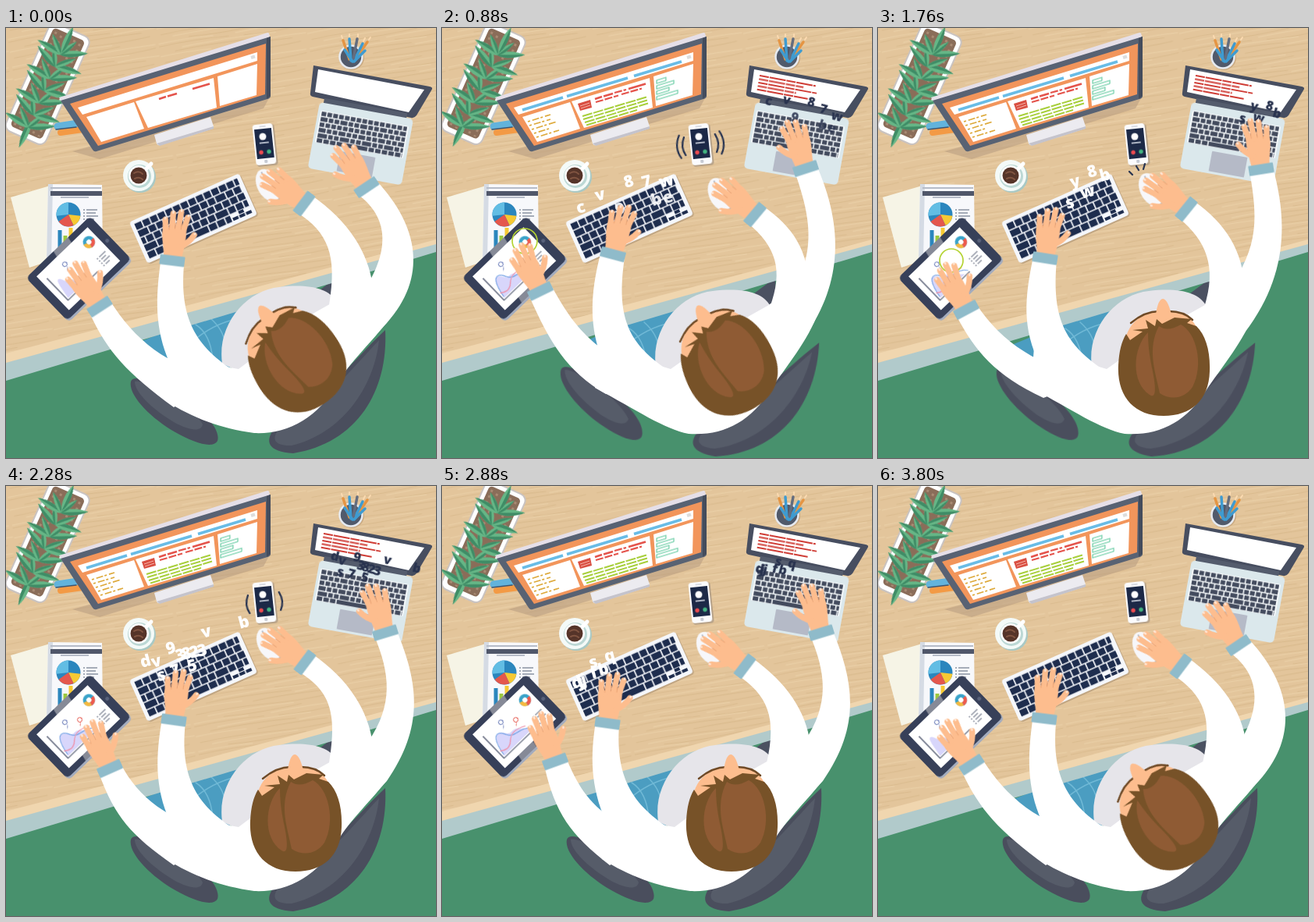
Animation of 551x551 px, one loop 3.84 s. Source, as an HTML page without scripts:

```html
<!DOCTYPE html>
<html lang="en">
<head>
<meta charset="utf-8">
<title>Busy desk</title>
<style>
html, body { margin: 0; width: 100%; height: 100%; overflow: hidden; background: #48916d; }
svg { display: block; width: 100vw; height: 100vh; }
.anim, .row, .burst text { animation: 3.84s ease-in-out infinite; }
.white { fill: #fff; }
.line { fill: none; stroke-linecap: round; }
.burst { font: 800 21px "Open Sans", "Noto Sans", sans-serif; }
.burst text { animation-name: rise; animation-delay: calc(var(--t) - 3.84s); }
.row { animation-name: typed; animation-delay: calc(var(--t) - 3.84s); }
.leaves { animation: sway 1.92s ease-in-out infinite; }

@keyframes rise {
  0% { opacity: 0; transform: translate(2px, 16px); }
  7%, 13% { opacity: 1; }
  10% { transform: none; }
  20%, 100% { opacity: 0; transform: translate(-3px, -14px); }
}
@keyframes typed { 0%, 4% { opacity: 0; } 4.1%, 76% { opacity: 1; } 76.1%, 100% { opacity: 0; } }
@keyframes sway { 50% { transform: rotate(2deg); } }

/* Body: leaning left in the middle of the loop */
@keyframes chair {
  0%, 58%, 100% { transform: none; }
  21%, 46% { transform: translate(-7px) rotate(5.5deg); }
}
@keyframes lean { 0%, 58%, 100% { transform: none; } 21%, 46% { transform: translate(-3px, 5px); } }
@keyframes torso {
  0%, 58%, 100% { d: path("M205,478L207,421L298,437L314,425L395,365L420,351L470,320L490,374C470,402 440,428 425,455C400,500 360,521 318,519C275,513 240,500 205,478Z"); }
  21%, 46% { d: path("M196,461L200,409L293,437L310,425L392,370L417,356L466,322L482,364C470,400 440,435 420,465C395,505 360,523 316,520C285,514 250,490 196,461Z"); }
}
@keyframes head {
  0%, 99%, 100% { transform: translate(372px, 427px) rotate(-33deg); }
  22.9% { transform: translate(367px, 431px) rotate(-27deg); }
  32.3% { transform: translate(367px, 432px) rotate(-12deg); }
  45.8% { transform: translate(366px, 432px); }
  59.4%, 78% { transform: translate(371px, 429px); }
}

/* Hands: cuff position and direction */
@keyframes tabletHand {
  0%, 99%, 100% { transform: translate(120px, 357px) rotate(-33deg); }
  22.9% { transform: translate(126px, 337px) rotate(-26deg); }
  32.3% { transform: translate(124px, 342px) rotate(-27deg); }
  45.8% { transform: translate(113px, 361px) rotate(-28deg); }
  59.4% { transform: translate(133px, 362px) rotate(-24deg); }
  75% { transform: translate(145px, 353px) rotate(-20deg); }
}
@keyframes keyHand {
  0%, 99%, 100% { transform: translate(213px, 298px) rotate(7deg); }
  22.9% { transform: translate(219px, 290px) rotate(15deg); }
  32.3% { transform: translate(217px, 292px) rotate(14deg); }
  45.8% { transform: translate(214px, 295px) rotate(9deg); }
  59.4% { transform: translate(215px, 300px) rotate(8deg); }
  75% { transform: translate(212px, 304px) rotate(8deg); }
}
@keyframes mouseHand {
  0%, 100% { transform: translate(382px, 225px) rotate(-53deg); }
  22.9%, 32.3% { transform: translate(401px, 239px) rotate(-50deg); }
  45.8% { transform: translate(395px, 232px) rotate(-51deg); }
  59.4% { transform: translate(383px, 226px) rotate(-53deg); }
  75%, 99.5% { transform: translate(388px, 231px) rotate(-53deg); }
}
@keyframes laptopHand {
  0%, 99%, 100% { transform: translate(462px, 204px) rotate(-34deg); }
  22.9% { transform: translate(466px, 180px) rotate(-18deg); }
  32.3% { transform: translate(473px, 180px) rotate(-14deg); }
  45.8% { transform: translate(491px, 181px) rotate(-9deg); }
  59.4%, 75% { transform: translate(486px, 188px) rotate(-17deg); }
}

/* Sleeves follow the cuffs */
@keyframes tabletArm {
  0%, 99%, 100% { d: path("M107,365C130,415 155,442 215,486L275,450C205,432 165,400 133,349Z"); }
  22.9% { d: path("M112,344C138,403 160,440 210,469L275,450C195,415 170,385 140,330Z"); }
  32.3% { d: path("M111,349C138,405 160,440 210,469L275,450C195,415 168,388 137,335Z"); }
  45.8% { d: path("M100,368C125,415 150,445 212,474L275,450C205,432 160,405 126,354Z"); }
  59.4% { d: path("M119,368C140,425 160,447 215,486L275,450C205,425 170,400 147,356Z"); }
  75% { d: path("M131,358C145,420 165,447 215,486L275,450C205,430 180,400 159,348Z"); }
}
@keyframes keyArm {
  0%, 99%, 100% { d: path("M198,300C192,345 190,385 210,430L302,445C245,412 222,375 228,304Z"); }
  22.9% { d: path("M204,286C188,345 190,385 205,425L300,445C240,408 222,375 234,294Z"); }
  32.3% { d: path("M202,288C187,345 188,385 205,425L300,445C238,408 220,375 232,296Z"); }
  45.8% { d: path("M199,293C188,345 184,385 208,432L300,445C240,408 222,375 229,297Z"); }
  59.4% { d: path("M200,298C192,345 190,385 210,430L302,445C245,412 222,375 230,302Z"); }
  75% { d: path("M197,302C190,345 190,385 210,430L302,445C245,412 222,375 227,306Z"); }
}
@keyframes mouseArm {
  0%, 100% { d: path("M374,237C412,262 425,290 414,355L470,330C464,288 440,248 391,214Z"); }
  22.9%, 32.3% { d: path("M392,250C428,280 438,310 420,358L470,335C470,285 450,255 411,228Z"); }
  45.8% { d: path("M386,244C420,272 435,305 418,358L470,335C468,285 445,250 405,222Z"); }
  59.4% { d: path("M375,238C415,262 425,290 414,355L470,330C464,288 440,248 392,215Z"); }
  75%, 99.5% { d: path("M380,243C416,268 430,295 416,355L472,330C466,288 442,252 397,220Z"); }
}
@keyframes laptopArm {
  0%, 99%, 100% { d: path("M449,212C482,235 497,272 464,328L430,440L488,378C540,320 530,255 475,196Z"); }
  22.9% { d: path("M452,184C466,225 478,265 462,310L425,450L474,382C518,310 508,240 480,176Z"); }
  32.3% { d: path("M459,183C470,225 480,265 462,310L425,450L474,382C520,310 513,240 487,177Z"); }
  45.8% { d: path("M476,183C485,235 488,270 462,315L425,450L476,382C527,310 523,240 506,179Z"); }
  59.4%, 75% { d: path("M472,192C492,240 497,280 464,328L430,440L488,378C535,310 530,255 500,184Z"); }
}

/* Screens and signals */
@keyframes show1 { 0%, 4% { opacity: 0; } 4.1%, 100% { opacity: 1; } }
@keyframes show2 { 0%, 9% { opacity: 0; } 9.1%, 100% { opacity: 1; } }
@keyframes show3 { 0%, 14% { opacity: 0; } 14.1%, 100% { opacity: 1; } }
@keyframes show4 { 0%, 19% { opacity: 0; } 19.1%, 100% { opacity: 1; } }
@keyframes ring { 0%, 17%, 29%, 56%, 68%, 100% { opacity: 0; } 17.1%, 28.9%, 56.1%, 67.9% { opacity: 1; } }
@keyframes farRing { 0%, 20%, 27%, 61%, 67%, 100% { opacity: 0; } 20.1%, 26.9%, 61.1%, 66.9% { opacity: 1; } }
@keyframes click { 0%, 43%, 49%, 100% { opacity: 0; } 43.1%, 48.9% { opacity: 1; } }
@keyframes chart { 0%, 98%, 100% { transform: scaleX(.55); } 22.9%, 45.8% { transform: scaleX(.85); } 75%, 85% { transform: none; } }
@keyframes curve { 0%, 10%, 90%, 100% { opacity: 0; } 20%, 80% { opacity: 1; } }
@keyframes pin { 0%, 55%, 90%, 100% { opacity: 0; } 58%, 85% { opacity: 1; } }
@keyframes touchTop { 0%, 17%, 29%, 100% { opacity: 0; transform: scale(.4); } 22.9% { opacity: 1; transform: none; } }
@keyframes touchLow { 0%, 39%, 52%, 100% { opacity: 0; transform: scale(.4); } 45.8% { opacity: 1; transform: none; } }
</style>
</head>
<body>
<svg viewBox="0 0 551 551">
<defs>
  <pattern id="grain" width="190" height="48" patternUnits="userSpaceOnUse" patternTransform="rotate(-9) scale(1 .75)">
    <path d="M0,0H190V48H0Z" fill="#e3c59b"/>
    <g class="line" stroke="#dabb8e" stroke-width="1.6">
      <path d="M5,5Q50,1 96,5T180,5M40,15Q80,19 140,14M0,25Q45,21 90,25M110,27Q140,31 185,26M20,36Q70,32 130,37M80,45Q120,42 170,45"/>
    </g>
    <g class="line" stroke="#e9cea5" stroke-width="2">
      <path d="M20,10Q70,7 130,10M0,20Q30,17 70,20M100,21Q145,18 185,20M30,31Q80,27 150,31M0,42Q30,39 65,42M135,40Q160,38 188,40"/>
    </g>
  </pattern>
  <g id="leaf">
    <path d="M0,2C6,-8 5,-22 0,-35C-5,-22 -6,-8 0,2Z" fill="#65b686"/>
    <path d="M0,2C6,-8 5,-22 0,-35Z" fill="#3f8c66"/>
  </g>
  <g id="tier">
    <use href="#leaf" transform="rotate(-82)"/><use href="#leaf" transform="rotate(64)"/>
    <use href="#leaf" transform="rotate(-46) scale(.8)"/><use href="#leaf" transform="rotate(28) scale(.75)"/>
  </g>
  <g id="hand">
    <path d="M-11,0C-12,-16 -18,-26 -17,-40L13,-44C15,-30 13,-14 11,0Z" fill="#fdbd8e"/>
    <g class="line" stroke="#fdbd8e" stroke-width="7.4">
      <path d="M-13,-36L-15,-51M-5.5,-40L-6,-60M2.5,-40L4,-63M9.5,-40L13,-57M7,-18Q18,-24 24,-36"/>
    </g>
    <path class="line" d="M-15.4,-52.5V-54M-6.1,-61V-63M4.2,-64.5V-66M13.6,-59L14,-60M24.5,-37L25,-38" stroke="#ffe6d5" stroke-width="2.5"/>
    <path class="line" d="M-9,-39V-45M-1.5,-41V-48M6.3,-41V-47" stroke="#e9a273" stroke-width=".9"/>
    <rect x="-16" y="-6.5" width="32" height="13" rx="1" fill="#8fbbca"/>
  </g>
</defs>

<path d="M0,0H551V551H0Z" fill="#48916d"/>

<!-- Legs and the far chair arm, partly under the desk -->
<g class="anim" style="animation-name:lean">
  <path d="M172,402L312,345L300,405L285,440L208,430Z" fill="#4b9dc1"/>
  <path class="line" d="M225,385Q240,395 250,418M243,380Q262,392 265,425M262,372Q280,388 280,405M235,405Q265,378 300,372" stroke="#70b9d6" stroke-width="1.5"/>
  <path d="M380,352L430,315L432,352Z" fill="#4b5161"/>
</g>

<!-- Desk -->
<path d="M0,0H551V287L0,452Z" fill="#b1cacb"/>
<path d="M0,0H551V277L0,429Z" fill="#f0d6af"/>
<path d="M0,0H551V271L0,417Z" fill="url(#grain)"/>

<!-- Plant -->
<g transform="translate(53 72) rotate(24)">
  <rect x="-28" y="-76" width="56" height="151" rx="9" fill="#fff" stroke="#c9c3c1" stroke-width="2"/>
  <rect x="-22" y="-70" width="44" height="138" rx="5" fill="#8a6d59"/>
  <path d="M-17,-66V66M-9,-64V66M9,-66V66M17,-64V66" stroke="#a88a73" stroke-width="3" stroke-dasharray="3 5"/>
  <g class="leaves">
    <use href="#leaf" y="58" transform="rotate(180 0 56)"/>
    <use href="#tier" y="60"/><use href="#tier" y="43" transform="scale(-1 1)"/><use href="#tier" y="26"/>
    <use href="#tier" y="9" transform="scale(-1 1)"/><use href="#tier" y="-8"/><use href="#tier" y="-25" transform="scale(-1 1)"/>
    <use href="#tier" y="-42"/><use href="#leaf" y="-46"/>
  </g>
</g>

<!-- Monitor -->
<path d="M85,158L120,168L330,103L338,88Z" fill="#b69b80" opacity=".55"/>
<path class="line" d="M66,126L92,122" stroke="#62b3dc" stroke-width="9"/>
<path class="line" d="M70,134L98,130" stroke="#f39a45" stroke-width="8"/>
<path class="line" d="M64,130L90,127" stroke="#3e5570" stroke-width="1.5"/>
<path d="M190,137L262,114L266,126Q266,129 262,130L198,150Q194,151 193,148Z" fill="#ecebf0"/>
<path d="M193,148L266,126V129L197,151Z" fill="#c4c3cc"/>
<path d="M68,89L335,6Q338,5 338,13L72,96Z" fill="#e5dfe8"/>
<path d="M70,93L339,11V87Q339,90 335,91L116,158Q113,159 111,156Z" fill="#586273"/>
<path d="M334,13L339,11V87L334,91Z" fill="#444c5c"/>
<path d="M82,97L333,20L332,85L118,151Z" fill="#f2955b"/>
<path class="white" d="M92,102L322,31V42L98,111ZM103,114L164,95L177,129L122,146ZM166,94L266,64L270,102L182,128ZM271,62L322,46L321,86L274,100Z"/>
<path d="M314,38L319,36.5" stroke="#ddd" stroke-width="4"/>
<path d="M196,91L205,88M207,87.5L219,84M239,78L261,71.5" stroke="#e4544c" stroke-width="2.5"/>
<path class="anim" style="animation-name:show1" d="M103,105L155,89M160,87.5L238,64M246,61.5L307,43" stroke="#69bce6" stroke-width="3.5"/>
<g class="anim" style="animation-name:show2">
  <path d="M174,97L190,92L192,102L177,106Z" fill="#d94f42"/>
  <path d="M177,100L189,96M178,103L190,99" stroke="#f6b3a8"/>
  <path d="M197,95L226,86.5M230,85L256,77.5M221,83L236,79" stroke="#e4544c" stroke-width="2.2" stroke-dasharray="10 2"/>
</g>
<path class="anim" style="animation-name:show3" d="M180,113L262,88.5M181,117L263,92.5M183,121L264,96.5M185,124.5L250,105" stroke="#a8cf3c" stroke-width="2" stroke-dasharray="13 1.5"/>
<g class="anim" style="animation-name:show4">
  <path d="M110,120L139,111M112,125L139,117M115,130L147,120M118,135L140,128M121,140L150,131" stroke="#dda93a" stroke-width="1.7" stroke-dasharray="3 3 9 2"/>
  <g fill="none" stroke="#4fc394" transform="translate(275 67) skewY(-17)">
    <path d="M0,0H12V4H0ZM0,7H22V11H0ZM0,14H16V18H0ZM0,21H27V25H0Z"/>
  </g>
</g>

<!-- Pencil pot -->
<circle cx="443" cy="38" r="16" fill="#c9a981"/>
<circle cx="442" cy="37" r="14.5" fill="#515a6b" stroke="#e6eaf0" stroke-width="2.5"/>
<g class="line" stroke-width="3.5">
  <path d="M440,40L432,16M449,38L463,18" stroke="#e59543"/><path d="M442,42L440,14M446,42L457,20" stroke="#3f9bd0"/>
  <path d="M445,40L450,14" stroke="#646d7f"/><path d="M444,43L434,28M446,43L460,29" stroke="#3f9bd0"/>
</g>
<path class="line" d="M431,13L430,10M440,11V8M451,11V8M458,17L460,13M465,15L467,12" stroke="#fbdab0" stroke-width="2"/>

<!-- Coffee -->
<circle cx="172" cy="191" r="20" fill="#a9c9c5"/>
<circle cx="170" cy="189" r="20" fill="#f4faf8"/>
<circle cx="171" cy="190" r="15" fill="#bcd8d5"/>
<path class="line" d="M179,181L186,174" stroke="#fff" stroke-width="5"/>
<circle cx="170" cy="189" r="13" class="white"/>
<circle cx="170" cy="189" r="10.5" fill="#553429"/>
<path class="line" d="M164,186Q170,182 175,187M165,193Q171,190 175,194" stroke="#805441" stroke-width="2"/>

<!-- Papers -->
<path d="M6,217L60,201L86,288L30,307Z" fill="#f6f4e6"/>
<path d="M54,200L123,201L124,292L52,299Z" fill="#f7f8fb"/>
<path d="M54,200L60,200L58,298L52,299Z" fill="#d5dbe4"/>
<path d="M57,205H122M70,217H106" stroke="#b6bcc8" stroke-width="2"/>
<path d="M57,212H123" stroke="#50576a" stroke-width="6"/>
<g fill="none" stroke-width="15.5" transform="rotate(-90 80 239)">
  <circle cx="80" cy="239" r="7.75" stroke="#2b86bd"/>
  <circle cx="80" cy="239" r="7.75" stroke="#f6c933" pathLength="100" stroke-dasharray="16 84" stroke-dashoffset="-27"/>
  <circle cx="80" cy="239" r="7.75" stroke="#e4574d" pathLength="100" stroke-dasharray="22 78" stroke-dashoffset="-43"/>
  <circle cx="80" cy="239" r="7.75" stroke="#62bde4" pathLength="100" stroke-dasharray="27 73" stroke-dashoffset="-73"/>
</g>
<path d="M99,233H117M99,237H115M99,241H118M99,245H113" stroke="#8b93a3" stroke-width="1.5" stroke-dasharray="2 2 30"/>
<path d="M69,284V259" stroke="#2b86bd" stroke-width="5"/><path d="M76,284V266" stroke="#9cc83e" stroke-width="5"/><path d="M83,284V256" stroke="#f6c933" stroke-width="5"/>

<!-- Tablet -->
<g transform="translate(93 308) rotate(-44)">
  <rect x="-57" y="-36" width="114" height="77" rx="6" fill="#a3acbe"/>
  <rect x="-57" y="-38" width="114" height="76" rx="6" fill="#374059"/>
  <path d="M-8,-38H18L2,38H-24Z" fill="#868a97"/>
  <rect x="-46" y="-30" width="91" height="60" class="white"/>
  <circle cx="51" cy="0" r="2.5" fill="#59627b"/>
  <g fill="none" stroke-width="4.5">
    <circle cx="33" cy="-15" r="5.5" stroke="#3aa3c9"/>
    <circle cx="33" cy="-15" r="5.5" stroke="#ef5a4c" pathLength="100" stroke-dasharray="30 70"/>
    <circle cx="33" cy="-15" r="5.5" stroke="#f6b93f" pathLength="100" stroke-dasharray="25 75" stroke-dashoffset="-30"/>
  </g>
  <path d="M25,8H40M25,12H37M25,16H40M25,20H36" stroke="#5c6478" stroke-width="1.2" stroke-dasharray="2 2 20"/>
  <path class="anim" style="animation-name:chart;transform-origin:-36px 19px" d="M-36,18C-32,8 -30,-8 -23,-8C-15,-8 -15,3 -7,2C2,1 4,10 16,18Z" fill="#d8d6fb"/>
  <g class="anim line" style="animation-name:curve" stroke-width="1.2">
    <path d="M-35,16C-30,-14 -20,-12 -15,0S4,4 14,17" stroke="#7aa6e6"/><path d="M-35,10Q-25,18 -16,9T10,9" stroke="#ee8fa8"/>
  </g>
  <path d="M-38,-19V20H15" fill="none" stroke="#39425c" stroke-width="1.2"/>
  <g class="line" stroke="#6375b5"><path d="M-9,-11L-12,-8"/><circle cx="-9" cy="-16" r="3"/></g>
  <g class="anim line" style="animation-name:pin" stroke="#e4574d"><circle cx="7" cy="-5" r="3"/><path d="M5,-2L2,1"/></g>
</g>
<g fill="none" stroke="#b4d334" stroke-width="1.7">
  <circle class="anim" style="animation-name:touchTop;transform-origin:106px 273px" cx="106" cy="273" r="16"/>
  <circle class="anim" style="animation-name:touchLow;transform-origin:94px 298px" cx="94" cy="298" r="15"/>
</g>

<!-- Keyboard -->
<g transform="translate(240 244) rotate(-24)">
  <rect x="-76" y="-27" width="154" height="58" rx="4" fill="#c0a582"/>
  <rect x="-77" y="-29" width="154" height="58" rx="4" fill="#f5f7fb"/>
  <g stroke="#1e2d4e" stroke-width="8.5">
    <path d="M-72,-20H72" stroke-dasharray="9 1.7"/><path d="M-72,-10H72" stroke-dasharray="13 1.7 9 1.7 9 1.7"/>
    <path d="M-72,0H72" stroke-dasharray="9 1.7" stroke-dashoffset="4"/><path d="M-72,10H72" stroke-dasharray="16 1.7 9 1.7 9 1.7 9 1.7"/>
    <path d="M-72,20H44" stroke-dasharray="10 1.7 10 1.7 10 1.7 49 1.7 10 1.7"/>
    <path d="M46,22H72M56,17H63" stroke-width="4" stroke-dasharray="7.5 1.7"/>
  </g>
</g>

<!-- Phone -->
<g transform="translate(331 149) rotate(-6)">
  <rect x="-12" y="-25" width="27" height="53" rx="4" fill="#b7a288"/>
  <rect x="-13" y="-26" width="26" height="52" rx="4" fill="#fbfbfd"/>
  <rect x="-11" y="-20" width="22" height="38" fill="#1c2947"/>
  <circle cx="-1" cy="-10" r="4.5" class="white"/>
  <path d="M-6,-2H6" stroke="#dfe5ee" stroke-width="1.5"/>
  <circle cx="-5" cy="10" r="2.7" fill="#ee4b50"/><circle cx="5" cy="10" r="2.7" fill="#43b581"/>
  <circle cy="22" r="2.2" fill="#c5c9d2"/><path d="M-4,-23H4" stroke="#b9bec9"/>
  <g class="line" stroke="#273350" stroke-width="2.3">
    <path class="anim" style="animation-name:ring" d="M-20,-11Q-26,1 -20,12M20,-11Q26,1 20,12"/>
    <path class="anim" style="animation-name:farRing" d="M-26,-14Q-34,1 -26,15M26,-14Q34,1 26,15"/>
  </g>
</g>
<path class="anim line" style="animation-name:click" d="M322,184L326,188M331,177L334,182M342,174L340,181" stroke="#273350" stroke-width="2.2"/>

<!-- Laptop -->
<path d="M394,48L543,75Q548,76 545,80L526,112Q523,116 519,115L393,88Q389,87 390,83Z" fill="#474e60"/>
<path class="white" d="M400,53L536,79L516,108L396,82Z"/>
<g transform="translate(407 61) rotate(10.5)" stroke="#cf3d36" stroke-width="2" stroke-dasharray="12 1 21 1">
  <path class="row" style="--t:0s" d="M0,0H73"/><path class="row" style="--t:.12s" d="M0,4.5H58"/>
  <path class="row" style="--t:.24s" d="M0,9H76"/><path class="row" style="--t:.36s" d="M0,13.5H50"/>
  <path class="row" style="--t:.48s" d="M0,18H66"/>
</g>
<g transform="translate(402 95) rotate(10.3)">
  <path d="M5,-6H113V4H5Z" fill="#545c6d"/>
  <rect width="122" height="86" rx="5" fill="#dbe8ec"/>
  <rect x="3" y="10" width="115" height="42" rx="2" fill="#f3f7f9"/>
  <g stroke="#434b5e" stroke-width="5.6">
    <path d="M5,14H116M5,28H116" stroke-dasharray="6 1.6"/><path d="M5,21H116M5,35H116" stroke-dasharray="9 1.6 6 1.6 6 1.6"/>
    <path d="M5,42H116" stroke-dasharray="12 1.6 6 1.6 6 1.6"/><path d="M5,48.5H116" stroke-dasharray="7 1.6 7 1.6 7 1.6 40 1.6 7 1.6 7 1.6"/>
  </g>
  <rect x="37" y="57" width="46" height="26" rx="1" fill="#b5bac7"/>
</g>

<!-- Chair -->
<g class="anim" style="animation-name:chair;transform-origin:320px 440px">
  <path d="M160,453C163,443 185,453 210,466C250,486 276,513 271,529C265,540 240,531 217,518C185,500 156,470 160,453Z" fill="#4a4e5d"/>
  <path d="M165,453C180,450 240,485 252,508C250,518 235,516 215,505C190,490 165,468 165,453Z" fill="#565c69"/>
  <path d="M486,387C440,430 400,485 345,512C330,530 336,543 368,545C450,532 490,465 486,387Z" fill="#4a4e5d"/>
  <path d="M478,400C440,440 405,485 352,512C338,526 344,536 366,535C430,520 472,460 478,400Z" fill="#565c69"/>
</g>

<!-- Flying characters -->
<g class="burst" fill="#fff" transform="translate(-6 7)">
  <text style="--t:.5s" rotate="-15" x="180 204 241 264 286" y="231 215 198 198 198">cv87w</text>
  <text style="--t:.68s" rotate="-15" x="229 275 290" y="226 214 211">9be</text>
  <text style="--t:.86s" rotate="-15" x="197 274 292 250 266 284 299" y="211 192 181 229 215 208 207">v8w9wbd</text>
  <text style="--t:1.36s" rotate="-15" x="254 276 292 248 267" y="198 185 190 225 212">y8bsw</text>
  <text style="--t:1.88s" rotate="-15" x="180 194 213 225 233 243 253 258 306" y="226 226 209 218 216 214 212 188 176">dv93823vb</text>
  <text style="--t:2s" rotate="-15" x="201 218 240" y="241 235 229">s75</text>
  <text style="--t:2.48s" rotate="-15" x="174 182 186 198 208 216 196" y="253 251 249 240 236 219 227">djjfbqs</text>
</g>
<g class="burst" fill="#28324e" transform="translate(420 95) rotate(30) scale(.78) translate(-186 -224)">
  <text style="--t:.5s" rotate="-15" x="180 204 241 264 286" y="231 215 198 198 198">cv87w</text>
  <text style="--t:.68s" rotate="-15" x="229 275 290" y="226 214 211">9be</text>
  <text style="--t:.86s" rotate="-15" x="197 274 292 250 266 284 299" y="211 192 181 229 215 208 207">v8w9wbd</text>
  <text style="--t:1.36s" rotate="-15" x="254 276 292 248 267" y="198 185 190 225 212">y8bsw</text>
  <text style="--t:1.88s" rotate="-15" x="180 194 213 225 233 243 253 258 306" y="226 226 209 218 216 214 212 188 176">dv93823vb</text>
  <text style="--t:2s" rotate="-15" x="201 218 240" y="241 235 229">s75</text>
  <text style="--t:2.48s" rotate="-15" x="174 182 186 198 208 216 196" y="253 251 249 240 236 219 227">djjfbqs</text>
</g>

<!-- Person -->
<path class="anim" style="animation-name:lean" d="M277,430C270,380 308,336 350,332C385,328 414,332 424,352L380,425L302,442Z" fill="#e6e5ea"/>
<g class="white">
  <path class="anim" style="animation-name:torso"/>
  <path class="anim" style="animation-name:tabletArm"/>
  <path class="anim" style="animation-name:keyArm"/>
  <path class="anim" style="animation-name:mouseArm"/>
  <path class="anim" style="animation-name:laptopArm"/>
</g>
<g class="anim" style="animation-name:tabletHand"><use href="#hand"/></g>
<g class="anim" style="animation-name:keyHand"><use href="#hand"/></g>
<g class="anim" style="animation-name:mouseHand">
  <g transform="translate(-9 -51) rotate(26)">
    <ellipse cx="1" cy="2" rx="14" ry="22" fill="#c5b8ad"/><ellipse rx="14" ry="22" fill="#f7f7fa"/><path d="M0,-19V-9" stroke="#b9bec9" stroke-width="2"/>
  </g>
  <use href="#hand" transform="scale(-1 1)"/>
</g>
<g class="anim" style="animation-name:laptopHand"><use href="#hand" transform="scale(-1 1)"/></g>

<g class="anim" style="animation-name:head">
  <path d="M-50,-28C-46,-58 -22,-70 0,-70C22,-70 38,-60 42,-48L0,-20Z" fill="#fdbd8e"/>
  <path class="line" d="M-42,-54Q-24,-69 -6,-69M7,-69Q26,-69 37,-58" stroke="#6f4a26" stroke-width="2.5"/>
  <path d="M-10,-64C-9,-74 -6,-85 -1,-85C4,-85 8,-74 10,-64Z" fill="#fdbd8e"/>
  <path d="M-58,0C-57,-18 -54,-30 -48,-40L-43,-32L-27,-43L-40,-45L-20,-47L-23,-58L-11,-50L-9,-59L-2,-53L14,-61L36,-59L30,-54L42,-50C54,-38 60,-18 59,8C58,45 35,65 0,65C-38,65 -60,40 -58,0Z" fill="#775228"/>
  <path d="M-20,-42C-40,-22 -42,22 -18,38C-9,44 -10,28 -14,8C-18,-10 -20,-25 -20,-42ZM-6,-50C-22,-20 -10,10 -5,36C10,46 28,42 37,28C52,0 42,-42 22,-52Q5,-42 -6,-50Z" fill="#8f5b34"/>
</g>
</svg>
</body>
</html>
```
